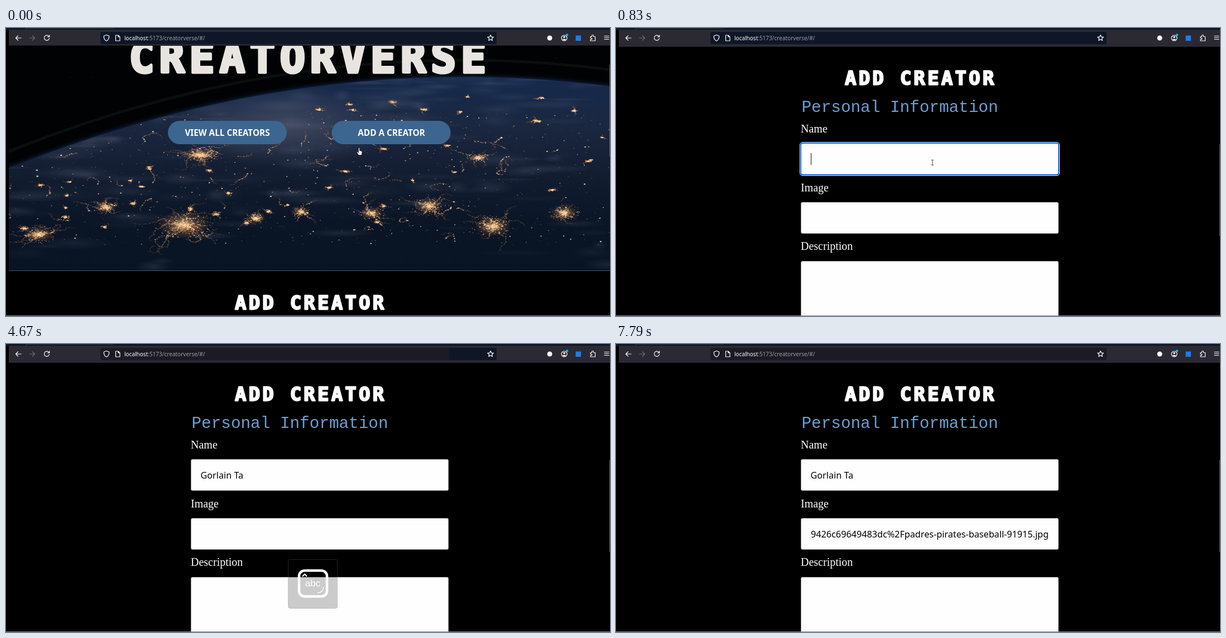
Animation of 1082x518 px, one loop 8000 ms. Source, as an HTML page with a canvas:

```html
<!DOCTYPE html>
<html lang="en">
<head>
<meta charset="utf-8">
<title>Add creator</title>
<style>
  html, body { margin: 0; width: 100%; height: 100%; overflow: hidden; background: #000; }
  #stage { position: absolute; left: 0; top: 0; width: 1082px; height: 518px; overflow: hidden; background: #000; }
  #view { position: absolute; left: 5px; top: 32px; width: 1077px; height: 486px; overflow: hidden; }
  #page { position: absolute; left: -5px; top: -32px; }
  #sky { position: absolute; left: 5px; top: 32px; }
  svg { position: absolute; left: 0; top: 0; display: block; }
  text { white-space: pre; }
  .title { font-family: "DejaVu Sans Mono", monospace; font-weight: 700; stroke-linejoin: round; }
  .sub { font: 29.33px "Liberation Mono", monospace; fill: #6c9fd0; }
  .label { font: 20px "Liberation Serif", serif; fill: #fff; }
  .value { font: 16.2px "Noto Sans", sans-serif; fill: #000; }
  .button { font: 700 15.3px "Noto Sans", sans-serif; fill: #fff; text-anchor: middle; }
  .url { font: 10px "Noto Sans", sans-serif; fill: #9c9ca5; }
  .key { font-family: "Liberation Sans", sans-serif; fill: #fff; text-anchor: middle; }
  .field { fill: #fefefe; stroke: #9a9aa2; }
  .icon { fill: none; stroke: #fbfbfe; stroke-width: 1.2; stroke-linecap: round; stroke-linejoin: round; }
</style>
</head>
<body>
<div id="stage">
  <div id="view">
    <div id="page">
      <canvas id="sky" width="1077" height="404"></canvas>
      <svg width="1082" height="930">
        <defs><clipPath id="inner"><rect x="348.5" y="718" width="427" height="54"/></clipPath></defs>
        <path d="M5 436.5H1082" stroke="#4d5866"/>
        <text class="title" x="220.5" y="79.5" font-size="75" letter-spacing="8.9" fill="#e8e5e0" stroke="#e8e5e0" stroke-width="5">CREATORVERSE</text>
        <g fill="#3c668f">
          <rect x="290" y="167" width="213" height="42" rx="21"/>
          <rect x="583.5" y="167" width="213" height="42" rx="21"/>
        </g>
        <text class="button" x="396.5" y="193.5">VIEW ALL CREATORS</text>
        <text class="button" x="690.5" y="193.5">ADD A CREATOR</text>

        <text class="title" x="410" y="506" font-size="34" letter-spacing="4.2" fill="#fff" stroke="#fff" stroke-width="2.3">ADD CREATOR</text>
        <text class="sub" x="332.5" y="555">Personal Information</text>
        <text class="label" x="331" y="592">Name</text>
        <text class="label" x="331" y="698">Image</text>
        <text class="label" x="331" y="803">Description</text>
        <rect class="field" x="331.5" y="611.5" width="461" height="56" rx="2.5"/>
        <rect class="field" x="331.5" y="717.5" width="461" height="56" rx="2.5"/>
        <rect class="field" x="331.5" y="823.5" width="461" height="120" rx="2.5"/>
        <g id="ring" fill="none">
          <rect x="329.5" y="609.5" width="465" height="60" rx="4.5" stroke="#dbe8ff"/>
          <rect x="331" y="611" width="462" height="57" rx="3" stroke="#1266e6" stroke-width="2"/>
        </g>
        <text class="value" id="name" x="348.5" y="646"></text>
        <g clip-path="url(#inner)">
          <text class="value" id="image" x="775" y="752" text-anchor="end">9426c69649483dc%2Fpadres-pirates-baseball-91915.jpg</text>
        </g>
        <rect id="caret" width="1" height="21" fill="#111"/>
      </svg>
    </div>
  </div>

  <svg width="1082" height="518">
    <rect width="1082" height="4" fill="#0e1626"/>
    <path d="M35.5 0V4M36 .5H193" stroke="#34343f"/>
    <rect x="5" y="3" width="1077" height="29" fill="#2b2a33"/>
    <path d="M5 31.5H1082" stroke="#16161d"/>
    <rect id="barEnd" x="760" y="7" width="119" height="22" rx="3"/>
    <path id="bar" d="M172 7H794V29H172Q169 29 169 26V10Q169 7 172 7Z"/>
    <text class="url" x="212" y="21.5"><tspan fill="#fbfbfe">localhost</tspan>:5173/creatorverse/#/</text>
    <g class="icon">
      <path d="M27 18H17.5M21.5 14L17.5 18L21.5 22"/>
      <path d="M42 18H51.5M47.5 14L51.5 18L47.5 22" stroke="#6d6c75"/>
      <path d="M77 15.3A4.6 4.6 0 1 0 77.6 18.5M77.8 12.8V16H74.5"/>
      <path d="M180 12.5L184.7 14.3Q185 21 180 23.5Q175 21 175.3 14.3Z"/>
      <path d="M196.5 13H201L204 16V23H196.5ZM201 13V16H204"/>
      <path id="star"/>
      <circle cx="1000" cy="18" r="5"/>
      <path d="M1047 15.5H1049.5V14A1.5 1.5 0 0 1 1052.5 14V15.5H1055.5V23H1047V20.5H1048.5A1.2 1.2 0 0 0 1048.5 18H1047Z"/>
      <path d="M1072 14.5H1080M1072 17.5H1080M1072 20.5H1080"/>
    </g>
    <circle cx="974" cy="18" r="4.5" fill="#fbfbfe"/>
    <path d="M997 20.5Q1000 18.5 1003 20.5Q1000 23.5 997 20.5Z" fill="#fbfbfe"/>
    <circle cx="1000" cy="16.3" r="1.8" fill="#fbfbfe"/>
    <circle cx="1005" cy="12.5" r="2.3" fill="#00b3f4"/>
    <rect x="1020.5" y="13.5" width="9.5" height="9.5" fill="#1a7df0"/>
    <rect id="thumb" x="1081" width="1" height="165" fill="#63636b"/>
    <path d="M0 517.5H1082" stroke="#858585"/>

    <g id="lock">
      <rect x="505.5" y="387.5" width="88" height="88" rx="4" fill="#000" fill-opacity=".2" stroke="#777" stroke-opacity=".3"/>
      <rect x="525" y="407.5" width="50" height="46.5" rx="10" fill="none" stroke="#fff" stroke-width="4.5"/>
      <path d="M531 418L535 414L539 418" fill="none" stroke="#fff" stroke-width="2"/>
      <path d="M568.5 437Q568.5 447 558 447.5" fill="none" stroke="#fff" stroke-width="1.3"/>
      <text class="key" id="caps" x="549.5" y="436"></text>
    </g>

    <path id="hand" d="M-1.5 -6Q-.5 -7 .3 -6V-1.5L3.8 -.5Q5 0 4.8 1.5L4 6.5H-1.5L-4.5 1.7Q-4.3 .5 -3 1L-1.5 2.3Z" fill="#fff" stroke="#222" stroke-width=".6"/>
    <path id="arrow" d="M0 0V9.5L2 7.7L3.5 10.7L5 10L3.5 7L6 6.8Z" fill="#fff" stroke="#222" stroke-width=".5"/>
    <path id="beam" d="M-2 -4.5H2M0 -4.5V4.5M-2 4.5H2" fill="none" stroke="#444"/>
  </svg>
</div>

<script>
const $ = id => document.getElementById(id);

function paintSky() {
  const c = $('sky').getContext('2d');
  let seed = 11;
  const rnd = (a = 0, b = 1) => a + (b - a) * ((seed = (seed * 16807) % 2147483647) / 2147483647);
  const horizon = x => 88 + 0.000247 * (820 - x) ** 2;
  const arc = up => {
    c.beginPath();
    for (let x = 0; x <= 1090; x += 10) c.lineTo(x, horizon(x) - up);
  };
  const blob = (x, y, rx, ry, rgb, a) => {
    c.save();
    c.translate(x, y);
    c.scale(rx, ry);
    const g = c.createRadialGradient(0, 0, 0, 0, 0, 1);
    g.addColorStop(0, `rgba(${rgb},${a})`);
    g.addColorStop(1, `rgba(${rgb},0)`);
    c.fillStyle = g;
    c.fillRect(-1, -1, 2, 2);
    c.restore();
  };
  const light = (x, y, glow) => {
    c.fillStyle = `rgba(255,${150 + 80 * glow},${70 + 120 * glow},${0.25 + 0.7 * glow})`;
    const s = 0.8 + glow * rnd(0, 1.3);
    c.fillRect(x, y, s * rnd(1, 2), s);
  };
  // A wandering string of lights that fades outwards.
  const road = (x, y, length) => {
    let a = rnd(0, 2 * Math.PI);
    for (let i = 0; i < length; i++) {
      a += rnd(-0.5, 0.5);
      x += Math.cos(a) * 1.6;
      y += Math.sin(a) * 0.9;
      light(x + rnd(-1, 1), y + rnd(-1, 1), rnd() * (1 - i / length));
    }
  };
  const city = (x, y, size) => {
    const flat = y < 300 ? 0.3 : 0.55;
    blob(x, y, size, size * flat, '225,150,75', 0.5);
    blob(x, y, size * 0.5, size * flat * 0.5, '255,225,170', 0.55);
    for (let i = 0; i < size * 7; i++) {
      const a = rnd(0, 2 * Math.PI), r = rnd() ** 1.6;
      light(x + Math.cos(a) * r * size * 1.2, y + Math.sin(a) * r * size * flat * 1.2, rnd(0.2, 1) * (1.1 - r * 0.6));
    }
    for (let i = 0; i < size / 3; i++) road(x, y, size * rnd(0.6, 1.8));
  };

  c.translate(-5, -32);
  c.fillStyle = '#010204';
  c.fillRect(5, 32, 1077, 404);
  for (let i = 0; i < 40; i++) light(rnd(0, 1082), rnd(32, 180), 0);
  c.lineWidth = 5;
  c.strokeStyle = 'rgba(40,62,48,.22)';
  arc(30);
  c.stroke();

  arc(0);
  c.lineTo(1090, 436);
  c.lineTo(0, 436);
  const g = c.createLinearGradient(0, 88, 0, 436);
  ['#152a4d', '#1a2740', '#131d31', '#0a1526', '#081424'].forEach((s, i) => g.addColorStop(i / 4, s));
  c.fillStyle = g;
  c.shadowColor = '#16305a';
  c.shadowBlur = 8;
  c.fill();
  c.shadowBlur = 0;
  c.clip();

  blob(500, 175, 210, 75, '115,118,138', 0.42);
  for (let i = 0; i < 150; i++) {
    const x = rnd(0, 1082), y = horizon(x) + 330 * rnd() ** 2;
    blob(x, y, rnd(15, 80), rnd(3, 14), '115,122,145', rnd(0.03, 0.2));
  }

  for (let i = 0; i < 900; i++) light(rnd(0, 1082), rnd(150, 390), rnd() ** 2);
  for (let i = 0; i < 70; i++) road(rnd(0, 1082), rnd(190, 380), rnd(8, 40));
  for (let i = 0; i < 45; i++) {
    const x = rnd(0, 1082);
    city(x, rnd(horizon(x) + 30, 370), rnd(3, 8));
  }
  // x, y, radius of the main cities
  [[348, 228, 36], [318, 354, 46], [58, 371, 26], [178, 322, 20], [447, 342, 18], [528, 330, 16],
   [655, 333, 20], [757, 320, 26], [845, 233, 18], [872, 357, 32], [1000, 332, 24]].forEach(p => city(...p));
}

function paintStar() {
  const points = [...Array(10).keys()].map(i => {
    const a = i * Math.PI / 5, r = i % 2 ? 2.6 : 5.6;
    return `${868 + r * Math.sin(a)} ${18 - r * Math.cos(a)}`;
  });
  $('star').setAttribute('d', `M${points.join('L')}Z`);
}

const LOOP = 8000;
const FRAME = 140;
const KEY_GAP = 150;
const NAME = 'Gorlain Ta';
const scrolls = [[0, 0], [150, 303], [270, 385], [410, 404]];
const bursts = [[1400, 1], [1850, 2], [2300, 7]]; // start, letters
const moves = [
  { start: 0, end: 0, hide: 410, from: [632, 216], to: [632, 216] },
  { start: 410, end: 690, hide: 1270, from: [632, 216], to: [567, 242] },
  { start: 3910, end: 3910, hide: 4060, from: [909, 152], to: [909, 152] },
  { start: 5660, end: 6220, hide: 6820, from: [690, 100], to: [490, 330] },
  { start: 7240, end: 7520, hide: 7520, from: [620, 445], to: [1022, 50] }
];

const clamp = (v, lo, hi) => Math.min(hi, Math.max(lo, v));
const show = (el, on) => el.setAttribute('visibility', on ? 'visible' : 'hidden');
const place = (el, x, y) => el.setAttribute('transform', `translate(${x} ${y})`);

function lettersAt(t) {
  return bursts.reduce((n, [start, count]) => n + clamp(Math.floor((t - start) / KEY_GAP) + 1, 0, count), 0);
}

function drawPointer(t, scroll) {
  const m = moves.find(m => t >= m.start && t < m.hide);
  let kind = '';
  if (m) {
    const step = Math.floor((t - m.start) / FRAME) * FRAME;
    const k = m.end > m.start ? clamp(step / (m.end - m.start), 0, 1) : 1;
    const [x, y] = m.from.map((v, i) => v + (m.to[i] - v) * k * (2 - k));
    const pageY = y + scroll;
    const inField = x > 331 && x < 793 && pageY > 611 && ((pageY - 611) % 106 < 57 || pageY > 823);
    const onButton = scroll < 385;
    kind = onButton ? 'hand' : inField ? 'beam' : 'arrow';
    place($(kind), onButton ? x + 1 : x, onButton ? y + 6 : y);
  }
  for (const id of ['hand', 'arrow', 'beam']) show($(id), id === kind);
}

function render(t) {
  const within = (a, b) => t >= a && t < b;
  const scroll = scrolls.findLast(s => s[0] <= t)[1];
  $('page').style.transform = `translateY(${-scroll}px)`;
  $('thumb').setAttribute('y', 66 + scroll * 0.354);

  $('name').textContent = NAME.slice(0, lettersAt(t));
  const pasted = t >= 6820;
  show($('image'), pasted);

  const onName = within(830, 4670), onImage = within(6370, 7790);
  const blinkOff = within(1270, 1400) || within(3610, 3910);
  show($('ring'), onName || onImage);
  place($('ring'), 0, onImage ? 106 : 0);
  show($('caret'), (onName || onImage) && !blinkOff);
  if (onName) place($('caret'), Math.round(349 + $('name').getComputedTextLength()), 629);
  else place($('caret'), pasted ? 774 : 349, 735);

  const upper = within(1270, 1550) || within(2900, 3200);
  show($('lock'), within(1270, 6670));
  $('lock').setAttribute('opacity', 1 - 0.5 * clamp((t - 6150) / 520, 0, 1));
  $('caps').textContent = upper ? 'ABC' : 'abc';
  $('caps').setAttribute('font-size', upper ? 15 : 17);

  $('bar').setAttribute('fill', t < 4670 ? '#0f1727' : '#1c1b22');
  $('barEnd').setAttribute('fill', t < 7520 ? '#0f1727' : '#1c1b22');
  drawPointer(t, scroll);
}

paintSky();
paintStar();
const start = performance.now();
(function tick() {
  render((performance.now() - start) % LOOP);
  requestAnimationFrame(tick);
})();
</script>
</body>
</html>
```
